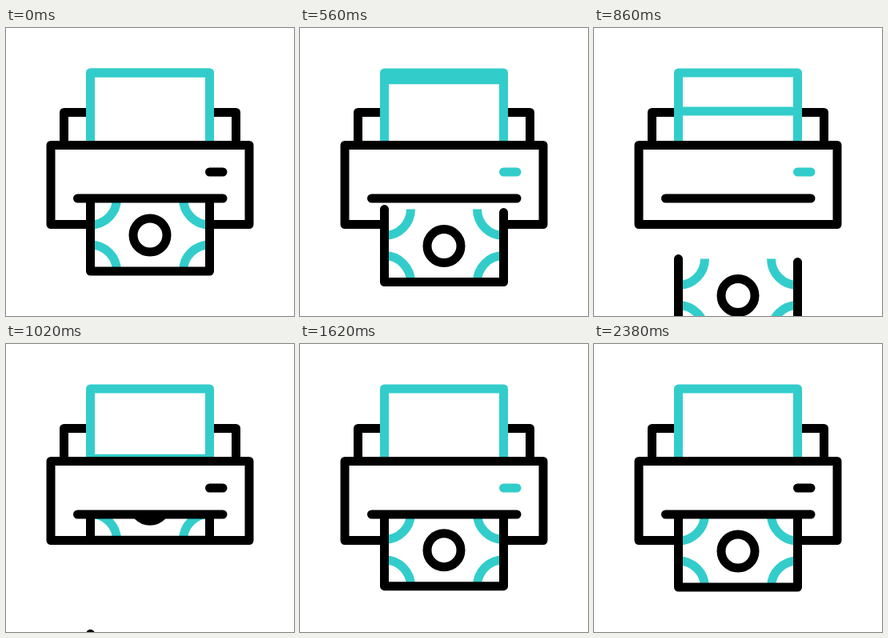
Recreate the animation shown at these times as an HTML page. Size 360x360 px, loop 2.4 s.

```html
<!DOCTYPE html>
<html lang="en">
<head>
<meta charset="utf-8">
<title>Money printer</title>
<style>
  html, body { margin: 0; height: 100%; overflow: hidden; background: #fff; }
  svg { display: block; width: 100%; height: 100%; }
  path, circle, rect { fill: none; stroke: #000; stroke-width: 11; stroke-linecap: round; stroke-linejoin: round; }
  .teal { stroke: #32cdcb; }
  .butt { stroke-linecap: butt; }
  .white { fill: #fff; }
  .bare { stroke: none; }
</style>
</head>
<body>
<svg viewBox="0 0 360 360">
  <defs>
    <clipPath id="slot"><rect y="213" width="360" height="147"/></clipPath>
    <g id="bill">
      <rect class="white bare" x="105.5" y="218.5" width="149" height="85"/>
      <path class="teal butt" d="M138.5 213A33 33 0 0 1 105.5 246M221.5 213A33 33 0 0 0 254.5 246
        M105.5 271A33 33 0 0 1 138.5 304M254.5 271A33 33 0 0 0 221.5 304"/>
      <circle cx="180" cy="259" r="21"/>
      <path d="M105.5 213V304H254.5V217"/>
    </g>
  </defs>

  <path d="M72.5 146V105.5H287.5V146"/>
  <path class="teal white" d="M105.5 146V56H254.5V146"/>
  <path class="teal" id="edge" d="M105.5 56H254.5"/>
  <rect class="white" x="56" y="146.5" width="248" height="99"/>
  <g clip-path="url(#slot)">
    <use href="#bill" id="fresh"/>
    <use href="#bill" id="falling"/>
  </g>
  <path d="M89.5 213H271"/>
  <path id="lamp" d="M254.5 180H271"/>
</svg>
<script>
  const LOOP = 2400, BLINK = 480;
  const get = id => document.getElementById(id);
  const shift = (id, y) => get(id).setAttribute('transform', `translate(0 ${y})`);

  function draw(now) {
    const t = now % LOOP;

    // The printed bill accelerates away while the next one eases out of the slot.
    shift('falling', t < 1200 ? 33 * (t / 700) ** 4 : 400);
    shift('fresh', t < 800 ? -200 : -59 * (Math.max(0, 2005 - t) / 985) ** 4);

    // The top edge of the fed sheet slides down into the body.
    const feed = 22 * (Math.max(0, t - 240) / 460) ** 2.6;
    shift('edge', Math.min(feed, 110));

    get('lamp').classList.toggle('teal', Math.floor(t / BLINK) % 2 === 1);
    requestAnimationFrame(draw);
  }
  draw(0);
</script>
</body>
</html>
```
